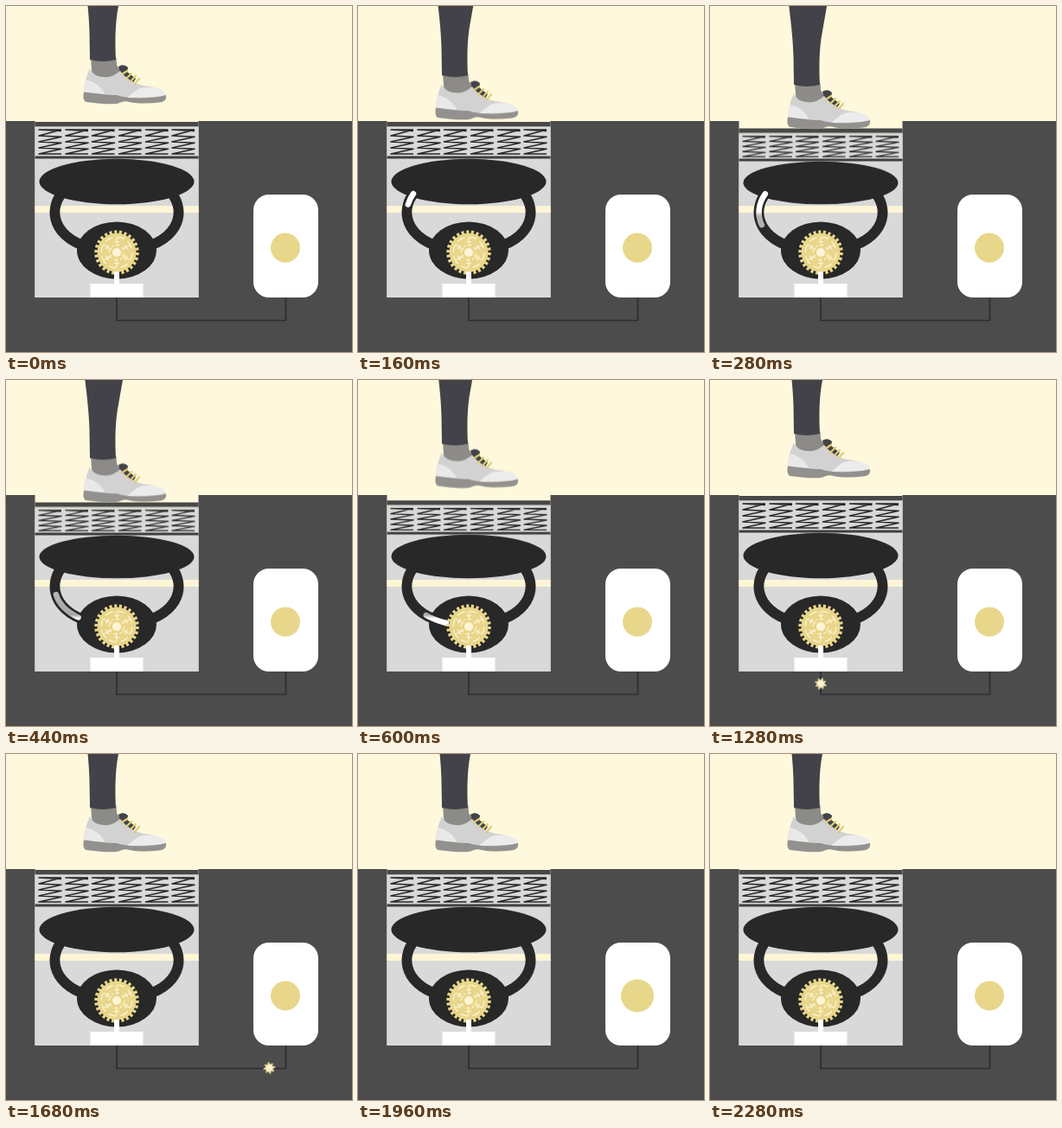
Write an HTML page without scripts that moves like this. It is 400 px wide and 400 px high and loops after 2.32 s.

```html
<!DOCTYPE html>
<html lang="en">
<head>
<meta charset="utf-8">
<title>Footstep energy</title>
<style>
html, body { margin: 0; width: 100%; height: 100%; overflow: hidden; background: #fef8dc; }
svg { display: block; width: 100%; height: 100%; }
.anim { animation: 2320ms linear infinite; }

.foot { animation-name: step; }
.plate { animation-name: sink; }
.springs { animation-name: squeeze; transform-origin: 0 139.5px; }
.floor { animation-name: settle; }
.bellows { animation-name: flatten; transform-origin: 128px 229px; }
.foot, .plate, .springs, .floor, .bellows { animation-timing-function: ease-in-out; }
.flow-in { animation-name: flow-in; stroke-dasharray: 42 300; }
.flow-out { animation-name: flow-out; stroke-dasharray: 54 300; }
.spark { animation-name: travel; }
.star { animation-name: spin; }
.badge { animation-name: pulse; transform-origin: 323px 279.5px; }

@keyframes step {
  0%, 32.8%, 100% { transform: none; }
  12.1%, 17.2% { transform: translateY(29px); }
}
@keyframes sink {
  0%, 7.1%, 34.5%, 100% { transform: none; }
  12.1%, 20.7% { transform: translateY(7.5px); }
}
@keyframes squeeze {
  0%, 7.1%, 34.5%, 100% { transform: none; }
  12.1%, 20.7% { transform: translateY(8.2px) scaleY(.84); }
}
@keyframes settle {
  0%, 7.1%, 34.5%, 100% { transform: none; }
  12.1%, 20.7% { transform: translateY(3px); }
}
@keyframes flatten {
  0%, 7.1%, 34.5%, 100% { transform: none; }
  12.1%, 20.7% { transform: scaleY(.945); }
}
@keyframes flow-in {
  0%, 3.99% { stroke-dashoffset: 42; opacity: 0; }
  4% { stroke-dashoffset: 42; opacity: 1; }
  31.2% { stroke-dashoffset: -100; opacity: 1; }
  31.21%, 100% { stroke-dashoffset: -100; opacity: 0; }
}
@keyframes flow-out {
  0%, 29.09% { stroke-dashoffset: 54; opacity: 0; }
  29.1% { stroke-dashoffset: 54; opacity: 1; }
  49.4% { stroke-dashoffset: -100; opacity: 1; }
  49.41%, 100% { stroke-dashoffset: -100; opacity: 0; }
}
@keyframes travel {
  0%, 53.87% { transform: translate(128px, 337px); opacity: 0; }
  53.88% { transform: translate(128px, 337px); opacity: 1; }
  56.34% { transform: translate(128px, 363px); }
  74.2% { transform: translate(323.5px, 363px); }
  76.64% { transform: translate(323.5px, 337px); opacity: 1; }
  76.65%, 100% { transform: translate(323.5px, 337px); opacity: 0; }
}
@keyframes spin { to { transform: rotate(360deg); } }
@keyframes pulse {
  0%, 76.7%, 98.3%, 100% { transform: none; }
  87.5% { transform: scale(1.16); }
}
</style>
</head>
<body>
<svg viewBox="0 0 400 400">
  <defs>
    <path id="spring" d="M26 0L0 7 26 8.2 0 14 26 15.2 0 21 26 22.2 0 28H26M26 0H0L26 1.5" />
    <path id="arm" pathLength="100" d="M64 217C50 236 52 268 102 281" />
    <path id="arm-out" pathLength="100" d="M154 281C204 268 206 236 192 217" />
    <path id="spoke" d="M0 -7V-17M-3 -12.5H3" />
    <linearGradient id="shade-in" gradientUnits="userSpaceOnUse" x1="0" y1="217" x2="0" y2="281">
      <stop offset=".32" stop-color="#fff" />
      <stop offset=".4" stop-color="#b5b5b5" />
      <stop offset=".85" stop-color="#a8a8a8" />
      <stop offset=".92" stop-color="#fff" />
    </linearGradient>
    <linearGradient id="shade-out" gradientUnits="userSpaceOnUse" x1="0" y1="217" x2="0" y2="281">
      <stop offset=".32" stop-color="#fff" />
      <stop offset=".4" stop-color="#b5b5b5" />
      <stop offset=".66" stop-color="#a8a8a8" />
      <stop offset=".74" stop-color="#fff" />
    </linearGradient>
  </defs>

  <rect width="400" height="400" fill="#fef8dc" />
  <path d="M0 133H33.5V337H222.5V133H400V400H0Z" fill="#4c4c4c" />

  <!-- pit and compressing tile -->
  <rect x="33.5" y="175" width="189" height="162" fill="#d9d9d9" />
  <g class="anim springs">
    <rect x="33.5" y="139" width="189" height="36" fill="#d9d9d9" />
    <g fill="none" stroke="#262626" stroke-width="1.5" stroke-linejoin="round">
      <use href="#spring" x="38" y="143" />
      <use href="#spring" x="69" y="143" />
      <use href="#spring" x="99.500" y="143" />
      <use href="#spring" x="130.500" y="143" />
      <use href="#spring" x="161.500" y="143" />
      <use href="#spring" x="192" y="143" />
    </g>
  </g>
  <rect class="anim plate" x="33.5" y="134" width="189" height="5.300" fill="#484848" />
  <rect class="anim floor" x="33.5" y="173.500" width="189" height="3" fill="#404040" />

  <!-- bellows, pipes and generator -->
  <rect x="33.5" y="231" width="189" height="8" fill="#fef5d6" />
  <g fill="none" stroke="#282828" stroke-width="12">
    <use href="#arm" />
    <use href="#arm-out" />
  </g>
  <ellipse class="anim bellows" cx="128" cy="203" rx="89.500" ry="26.200" fill="#282828" />
  <ellipse cx="128" cy="282.500" rx="46" ry="33" fill="#282828" />
  <g fill="none" stroke-width="6.500" stroke-linecap="round">
    <use class="anim flow-in" href="#arm" stroke="url(#shade-in)" />
    <use class="anim flow-out" href="#arm-out" stroke="url(#shade-out)" />
  </g>

  <g transform="translate(128 285)" fill="none">
    <circle r="22.500" fill="#e8d68a" />
    <circle r="23.500" stroke="#e8d68a" stroke-width="4.500" pathLength="52" stroke-dasharray="1.100 .9" />
    <g stroke="#fef5d6" stroke-width="1.200">
      <circle r="18" pathLength="48" stroke-dasharray="4 2" />
      <circle r="9" pathLength="32" stroke-dasharray="2 2" />
      <use href="#spoke" />
      <use href="#spoke" transform="rotate(60)" />
      <use href="#spoke" transform="rotate(120)" />
      <use href="#spoke" transform="rotate(180)" />
      <use href="#spoke" transform="rotate(240)" />
      <use href="#spoke" transform="rotate(300)" />
    </g>
    <circle r="5" fill="#fef5d6" />
  </g>

  <!-- wire, spark and battery -->
  <path d="M128 337V363.500H323.500V337" fill="none" stroke="#2d2d36" stroke-width="1.700" />
  <g class="anim spark">
    <path class="anim star" fill="#fdf3cc" stroke="#e8d68a" stroke-width=".7"
      d="M0 -7L1.500 -3.600 4.600 -4.600 3.600 -1.500 7 0 3.600 1.500 4.600 4.600 1.500 3.600 0 7 -1.500 3.600 -4.600 4.600 -3.600 1.500 -7 0 -3.600 -1.500 -4.600 -4.600 -1.500 -3.600Z" />
  </g>
  <path d="M125 307H131V321H158.500V337H97.500V321H125Z" fill="#fff" />
  <rect x="286" y="218" width="75" height="119" rx="18" fill="#fff" />
  <circle class="anim badge" cx="323" cy="279.500" r="17" fill="#e8d68a" />

  <!-- leg and shoe -->
  <g class="anim foot">
    <path d="M98 60H127.500L128 68 137 84 100 86Z" fill="#8c8b87" />
    <path d="M90 -40C93 -15 96 8 96.500 30L97 62Q112 66 127 62C126 42 126 20 130 0L137 -40Z" fill="#424248" />
    <path d="M130 70Q136 66 141 71L140 76 150 84 146 90 133 82Z" fill="#424248" />
    <path d="M97 72C100 80 108 83 118 82 126 81 130 76 132 75 139 84 149 90 159 92 172 94 183 96 184 103L182 107H92C88 99 91 86 97 72Z" fill="#d2d2d2" />
    <path d="M92 85C103 87 111 94 115 103H91Q89 94 92 85Z" fill="#e9e9e9" />
    <path d="M151 97C160 92 176 93 183 99L184 105 140 106Z" fill="#ececec" />
    <path d="M90 99.500C105 101 116 103 128 103 140 108 170 107 185 103 186 109 182 111 177 111.500 165 113 152 113 143 111 136 109 133 112 128 113 115 114 102 112 93 111 89 110 89 104 90 99.500Z" fill="#92918e" />
    <path d="M134 79L140 75M139 84L145 78M144 87L150 81M149 90L154 84" fill="none" stroke="#e3cd72" stroke-width="2.200" stroke-linecap="round" />
  </g>
</svg>
</body>
</html>
```
